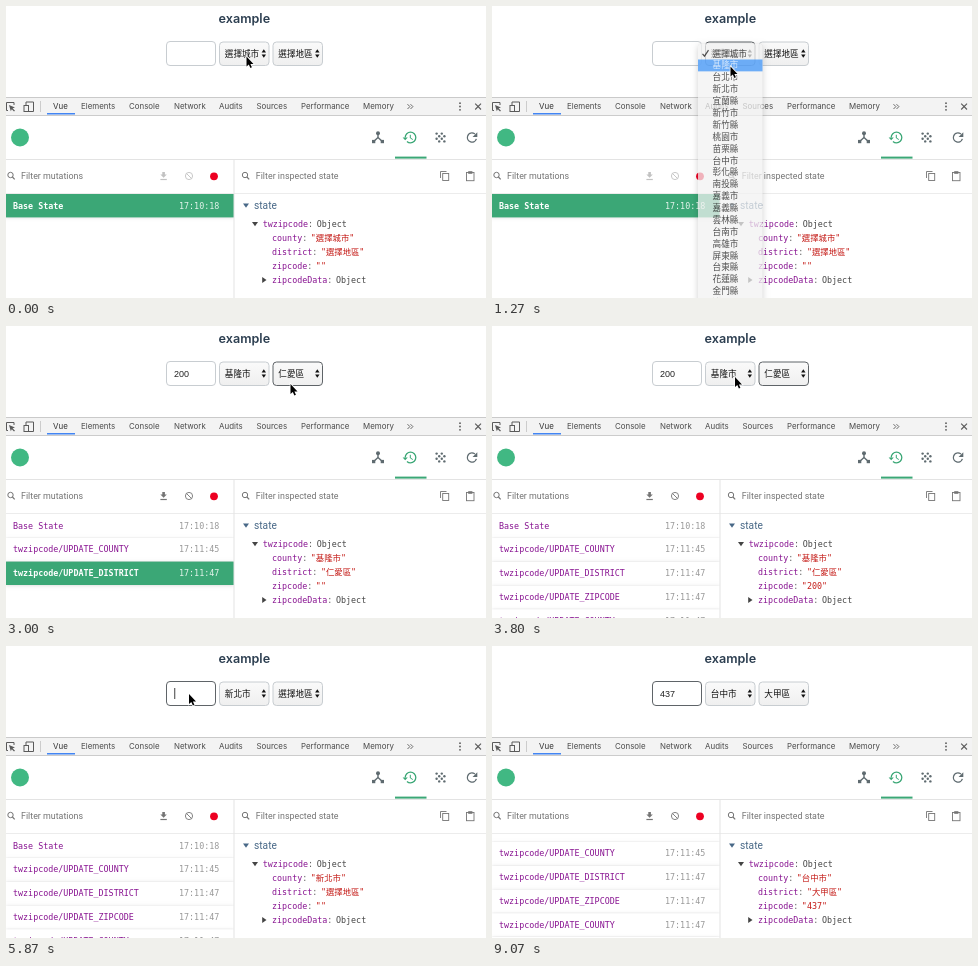
Recreate the animation shown at these times as an HTML page with a canvas. Size 480 px wide and 292 px high, loop 9.59 s.

```html
<!DOCTYPE html>
<html lang="zh-Hant">
<head>
<meta charset="utf-8">
<title>example</title>
<style>
html, body { margin: 0; width: 100%; height: 100%; overflow: hidden; background: #fff; }
canvas { display: block; width: 480px; height: 292px; }
</style>
</head>
<body>
<canvas id="stage"></canvas>
<script>
const W = 480, H = 292, LOOP = 9590;
const canvas = document.getElementById('stage');
const ratio = window.devicePixelRatio || 1;
canvas.width = W * ratio;
canvas.height = H * ratio;
const ctx = canvas.getContext('2d');

const CJK = '"Noto Sans CJK TC", "Noto Sans CJK", sans-serif';
const UI = '7.92px Inter, sans-serif';
const MONO = '8.37px "DejaVu Sans Mono", ' + CJK;
const FORM = '500 8.6px "Liberation Sans", ' + CJK;
const DIGITS = '9px "Liberation Sans", sans-serif';
const GREEN = '#3ba776', PURPLE = '#881391', RED = '#c41a16', GREY = '#757575', LINE = '#e3e3e3';
const BORDER = '#c8cdd1', FOCUSED = '#5f6468';
const PITCH = 11.88, ROW = 23.8, MENU_W = 64.5;

const CITIES = ('選擇城市 基隆市 台北市 新北市 宜蘭縣 新竹市 新竹縣 桃園市 苗栗縣 台中市 彰化縣 南投縣 ' +
  '嘉義市 嘉義縣 雲林縣 台南市 高雄市 屏東縣 台東縣 花蓮縣 金門縣 連江縣 澎湖縣').split(' ');
const AREAS = '選擇地區 仁愛區 信義區 中正區 中山區 安樂區 暖暖區 七堵區'.split(' ');

// Values that switch at given times
const county = [[0, CITIES[0]], [1470, CITIES[1]], [4730, CITIES[3]], [7670, CITIES[9]]];
const countyState = [[0, CITIES[0]], [1470, CITIES[1]], [4790, CITIES[3]], [7600, CITIES[9]]];
const district = [[0, AREAS[0]], [2870, AREAS[1]], [4730, AREAS[0]], [7670, '大甲區']];
const districtState = [[0, AREAS[0]], [2870, AREAS[1]], [4790, AREAS[0]], [7600, '大甲區']];
const zip = [[0, ''], [2930, '200'], [4730, ''], [6730, '4'], [7000, '43'], [7530, '437']];
const zipState = [[0, ''], [3070, '200'], [4860, ''], [6730, '4'], [7070, '43'], [7600, '437']];
const focus = [[0, ''], [70, 'county'], [1870, 'district'], [3870, 'county'], [5720, 'zip']];
const rowCount = [[0, 1], [1470, 2], [2870, 3], [3070, 7]];
const caretStart = [[0, 0], [5720, 5720], [6730, 6730], [7000, 7000], [7530, 7530]];

const rows = [['Base State', '17:10:18'], ['twzipcode/UPDATE_COUNTY', '17:11:45'],
  ['twzipcode/UPDATE_DISTRICT', '17:11:47'], ['twzipcode/UPDATE_ZIPCODE', '17:11:47'],
  ['twzipcode/UPDATE_COUNTY', '17:11:47'], ['twzipcode/UPDATE_DISTRICT', '17:11:47'],
  ['twzipcode/UPDATE_ZIPCODE', '17:11:47']];

const menus = [
  { x: 206, items: CITIES, picked: 0, open: 70, fade: 1200 },
  { x: 258.5, items: AREAS, picked: 0, open: 1870, fade: 2600 },
  { x: 206, items: CITIES, picked: 1, open: 3870, fade: 4455 }
];
const FADE = 270;

const path = [[0, 240.5, 50.5], [250, 240.5, 50.5], [950, 238.5, 60.5], [1400, 238.5, 60.5],
  [1800, 287.5, 47], [2300, 287.5, 47], [2580, 284.5, 58], [3150, 284.5, 58],
  [3780, 243, 51], [3950, 243, 51], [4400, 242.5, 63.7], [4850, 242.5, 63.7], [5400, 183, 48]];

const at = (steps, t) => steps.reduce((v, s) => t >= s[0] ? s[1] : v, steps[0][1]);
const ease = u => { u = Math.max(0, Math.min(1, u)); return u * u * (3 - 2 * u); };

function pointer(t) {
  const last = path[path.length - 1];
  if (t >= last[0]) return [last[1], last[2]];
  const i = path.findIndex(p => p[0] > t);
  const a = path[i - 1], b = path[i];
  const u = ease((t - a[0]) / (b[0] - a[0]));
  return [a[1] + (b[1] - a[1]) * u, a[2] + (b[2] - a[2]) * u];
}

function text(str, x, y, font, color) {
  ctx.font = font;
  ctx.fillStyle = color;
  ctx.fillText(str, x, y);
  return x + ctx.measureText(str).width;
}
function rect(x, y, w, h, color) {
  ctx.fillStyle = color;
  ctx.fillRect(x, y, w, h);
}
function box(x, y, w, h, r, fill, stroke) {
  ctx.beginPath();
  ctx.roundRect(x, y, w, h, r);
  if (fill) { ctx.fillStyle = fill; ctx.fill(); }
  if (stroke) { ctx.strokeStyle = stroke; ctx.lineWidth = 1; ctx.stroke(); }
}
function shadow(alpha, blur, y) {
  ctx.shadowColor = `rgba(0,0,0,${alpha})`;
  ctx.shadowBlur = blur * ratio;
  ctx.shadowOffsetY = y * ratio;
}
function poly(color, ...pts) {
  ctx.beginPath();
  pts.forEach(p => ctx.lineTo(p[0], p[1]));
  ctx.closePath();
  ctx.fillStyle = color;
  ctx.fill();
}
function line(color, width, ...pts) {
  ctx.beginPath();
  pts.forEach(p => ctx.lineTo(p[0], p[1]));
  ctx.strokeStyle = color;
  ctx.lineWidth = width;
  ctx.stroke();
}
function arc(x, y, r, color, width, from = 0, to = 7) {
  ctx.beginPath();
  ctx.arc(x, y, r, from, to);
  ctx.strokeStyle = color;
  ctx.lineWidth = width;
  ctx.stroke();
}
function dot(x, y, r, color) {
  ctx.beginPath();
  ctx.arc(x, y, r, 0, 7);
  ctx.fillStyle = color;
  ctx.fill();
}

function select(x, label, focused) {
  const g = ctx.createLinearGradient(0, 36, 0, 60);
  g.addColorStop(0, '#fafafa');
  g.addColorStop(1, '#efefef');
  box(x + .5, 36, 49.5, 23.5, 3.5, g, focused ? FOCUSED : BORDER);
  text(label, x + 5.8, 50.6, FORM, '#111');
  const c = x + 44.8;
  poly('#111', [c - 2.2, 46.5], [c, 43.2], [c + 2.2, 46.5]);
  poly('#111', [c - 2.2, 48.5], [c, 51.8], [c + 2.2, 48.5]);
}

function form(t) {
  text('example', 212.6, 16.8, '600 12.6px Inter, sans-serif', '#2c3e50');
  const f = at(focus, t), value = at(zip, t);
  box(160.5, 35.5, 49, 24, 3.5, '#fff', f === 'zip' ? FOCUSED : BORDER);
  const end = text(value, 168, 50.5, DIGITS, '#222');
  const blink = Math.floor((t - at(caretStart, t)) / 490) % 2 === 0;
  if (f === 'zip' && blink) rect(end + .4, 42, .8, 11, '#111');
  select(213, at(county, t), f === 'county');
  select(266.5, at(district, t), f === 'district');
}

function tabs() {
  rect(0, 91, W, 19, '#f3f3f3');
  rect(0, 91, W, 1, '#cacaca');
  rect(0, 109, W, 1, '#cccccc');
  const dark = '#5a5a5a';
  line(dark, 1, [2, 104.5], [.5, 104.5], [.5, 96.5], [8, 96.5], [8, 99]);
  poly(dark, [3, 99], [9, 101.5], [6.6, 102.3], [9, 104.8], [8, 105.6], [5.8, 103.2], [4.8, 105.2]);
  line(dark, 1, [20, 99], [20, 96], [27.5, 96], [27.5, 105.5], [23, 105.5]);
  ctx.strokeStyle = dark;
  ctx.strokeRect(18, 99.5, 4.5, 6);
  rect(34, 95, 1, 11, '#ccc');
  const names = [['Vue', 47], ['Elements', 75], ['Console', 123], ['Network', 168], ['Audits', 213],
    ['Sources', 250.5], ['Performance', 295], ['Memory', 357]];
  names.forEach(([s, x], i) => text(s, x, 103.4, UI, i ? '#4a4a4a' : '#333'));
  rect(41, 107, 28, 1.5, '#4285f4');
  [401.5, 404.5].forEach(x => line(dark, .9, [x, 98.2], [x + 2.4, 100.6], [x, 103]));
  [97.2, 100.5, 103.8].forEach(y => dot(454, y, .9, dark));
  line(dark, 1.1, [469.2, 97.7], [475, 103.5]);
  line(dark, 1.1, [475, 97.7], [469.2, 103.5]);
}

function header() {
  rect(0, 110, W, 44, '#fff');
  dot(14, 131.5, 9, '#41b883');
  const c = '#5f6b70';
  line(c, 1.4, [372, 127], [372, 131.5], [367.6, 135.6]);
  line(c, 1.4, [372, 131.5], [376.4, 135.6]);
  dot(372, 127.2, 2, c);
  rect(366, 133.9, 3.3, 3.3, c);
  rect(374.7, 133.9, 3.3, 3.3, c);

  arc(404.5, 131.5, 5.3, GREEN, 1.3, -Math.PI, 2.3);
  poly(GREEN, [396.6, 131.5], [401.8, 131.5], [399.2, 134.3]);
  line(GREEN, 1, [404.3, 128.8], [404.3, 132], [406.8, 133.5]);

  for (let j = 0; j < 4; j++)
    for (let i = 0; i < 4; i++)
      if ((i + j) % 2 === 0) dot(430.6 + i * 2.6, 127.6 + j * 2.6, 1.2, c);

  arc(466, 131.5, 4.6, c, 1.3, .3, 5.4);
  poly(c, [471.3, 126.2], [471.3, 130.9], [466.6, 130.9]);
  rect(0, 153, W, 1, LINE);
  rect(389, 150.6, 31.5, 2, GREEN);
}

function search(x) {
  arc(x, 169, 2.7, GREY, 1);
  line(GREY, 1.2, [x + 1.9, 171], [x + 4.2, 173.3]);
}

function filters(t) {
  rect(0, 154, W, 34, '#fff');
  search(4.5);
  search(239);
  const font = '8.9px Roboto, sans-serif';
  text('Filter mutations', 15, 173.3, font, GREY);
  text('Filter inspected state', 249.8, 173.3, font, GREY);
  const c = at(rowCount, t) > 1 ? '#757575' : '#c2c2c2';
  rect(156.3, 166, 2.6, 3, c);
  poly(c, [154.4, 168.6], [160.8, 168.6], [157.6, 171.8]);
  rect(154.4, 172.9, 6.4, 1.2, c);
  arc(183, 170, 3.6, c, .9);
  line(c, .9, [180.5, 167.5], [185.5, 172.5]);
  dot(208, 170.3, 3.9, '#ed0022');
  line(GREY, .9, [434.5, 172], [434.5, 165.5], [440.5, 165.5]);
  ctx.strokeRect(436.7, 167.5, 6, 7);
  ctx.strokeRect(460.5, 166.5, 7.5, 8.2);
  rect(462.2, 165.2, 4.2, 2.6, GREY);
  rect(0, 187, W, 1, '#ececec');
}

function mutations(t) {
  const count = at(rowCount, t);
  const scroll = 16 * ease((t - 7980) / 350);
  ctx.save();
  ctx.beginPath();
  ctx.rect(0, 188, 228, 104);
  ctx.clip();
  rows.slice(0, count).forEach(([name, time], i) => {
    const y = 188 + i * ROW - scroll, active = i === count - 1;
    shadow(.12, 3.3, .7);
    rect(0, y, 228, ROW - .4, active ? GREEN : '#fff');
    shadow(0, 0, 0);
    text(name, 7, y + 14.6, (active ? 'bold ' : '') + MONO, active ? '#fff' : PURPLE);
    text(time, 173, y + 14.6, MONO, active ? '#e4f4ec' : '#999');
  });
  ctx.restore();
}

function field(key, x, y, value, color) {
  const end = text(key, x, y, MONO, PURPLE);
  text(value, text(':', end, y, MONO, '#666') + 3.6, y, '500 ' + MONO, color);
}

function state(t) {
  poly('#486887', [237, 197.5], [243, 197.5], [240, 201.8]);
  text('state', 248, 202.6, '10.2px Roboto, sans-serif', '#486887');
  poly('#444', [246, 216], [252, 216], [249, 220.3]);
  field('twzipcode', 256.7, 221, 'Object', '#444');
  const entries = { county: countyState, district: districtState, zipcode: zipState };
  Object.keys(entries).forEach((k, i) =>
    field(k, 266, 235 + i * 14, '"' + at(entries[k], t) + '"', RED));
  poly('#444', [256.2, 271], [256.2, 277], [260.5, 274]);
  field('zipcodeData', 266, 277, 'Object', '#444');
}

function menu(m, t, y) {
  if (t < m.open || t >= m.fade + FADE) return;
  const top = 41.6 - m.picked * PITCH, height = m.items.length * PITCH + 7;
  const hover = Math.floor((y + 2 - top) / PITCH);
  ctx.save();
  ctx.globalAlpha = Math.min(1, 1 - (t - m.fade) / FADE);

  // Shadow only outside the panel, so that it stays clear while fading
  ctx.save();
  ctx.beginPath();
  ctx.rect(0, 0, W, H);
  ctx.roundRect(m.x, top - 4, MENU_W, height, 3.5);
  ctx.clip('evenodd');
  shadow(.25, 6, 2);
  box(m.x, top - 4, MENU_W, height, 3.5, '#c8c8c8');
  ctx.restore();

  box(m.x, top - 4, MENU_W, height, 3.5, '#f2f2f2');
  m.items.forEach((s, i) => {
    const y0 = top + i * PITCH, on = i === hover, color = on ? '#fff' : '#151515';
    if (on) rect(m.x, y0, MENU_W, PITCH, '#3d94f8');
    if (i === m.picked) line(color, 1.2, [m.x + 4.5, y0 + 6.2], [m.x + 6.5, y0 + 8.6], [m.x + 10.5, y0 + 2.6]);
    text(s, m.x + 14.6, y0 + 9, FORM, color);
  });
  ctx.restore();
}

function arrow(x, y) {
  ctx.save();
  ctx.translate(x, y);
  ctx.beginPath();
  [[0, 0], [0, 10], [2.3, 7.9], [3.9, 11.4], [5.4, 10.7], [3.9, 7.4], [7, 7.4]]
    .forEach(p => ctx.lineTo(p[0], p[1]));
  ctx.closePath();
  ctx.strokeStyle = '#fff';
  ctx.lineWidth = 1.5;
  ctx.stroke();
  ctx.fillStyle = '#000';
  ctx.fill();
  ctx.restore();
}

function draw(t) {
  ctx.setTransform(ratio, 0, 0, ratio, 0, 0);
  rect(0, 0, W, H, '#fff');
  form(t);
  tabs();
  header();
  filters(t);
  mutations(t);
  state(t);
  rect(227.5, 154, 1, 138, LINE);
  const [x, y] = pointer(t);
  menus.forEach(m => menu(m, t, y));
  if (t < 6730) arrow(x, y);
}

const start = performance.now();
function frame(now) {
  draw(Math.max(0, now - start) % LOOP);
  requestAnimationFrame(frame);
}
draw(0);
requestAnimationFrame(frame);
</script>
</body>
</html>
```
